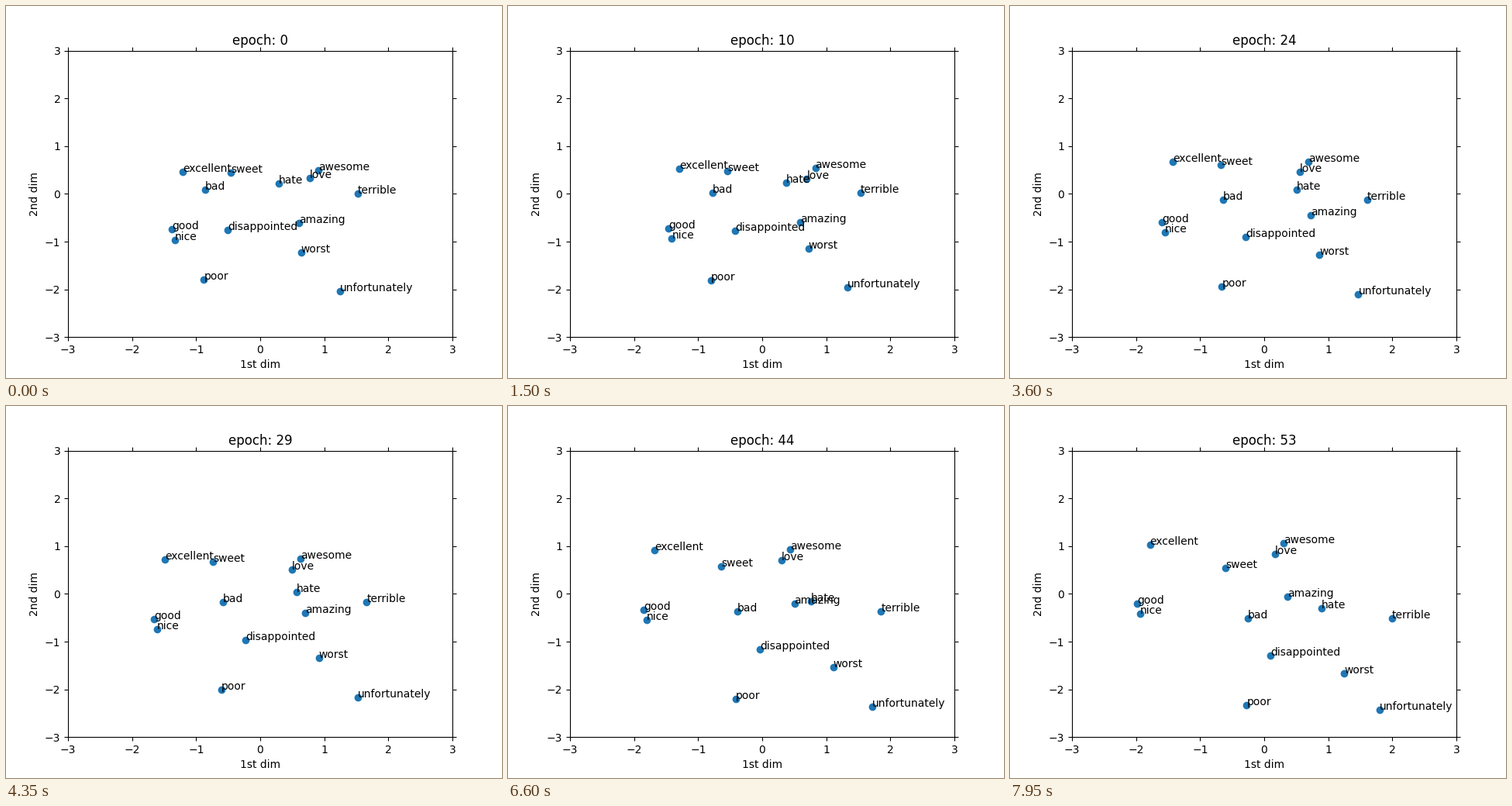
A matplotlib script for the animation above (8000 ms loop, 640x480 px).

```python
import numpy as np
import matplotlib.pyplot as plt
from matplotlib.animation import FuncAnimation

FRAMES, INTERVAL, FRAMES_PER_EPOCH = 160, 50, 3
UP_LEFT, DOWN_RIGHT = np.array([-1, 1]), np.array([1, -1])
X_ONLY, BOTH = np.array([1, 0]), np.array([1, 1])

# word: (x, y, vertical distance lost while starting the wrong way)
PRAISE = {
    "excellent": (-1.21, 0.46, 0.01),
    "good": (-1.38, -0.74, 0.065),
    "nice": (-1.33, -0.97, 0.05),
    "sweet": (-0.46, 0.445, 0.05),
    "love": (0.775, 0.33, 0.095),
    "awesome": (0.91, 0.49, 0.03),
    "amazing": (0.605, -0.61, 0.06),
}
CRITICISM = {
    "bad": (-0.86, 0.09, 0.01),
    "poor": (-0.88, -1.795, 0.07),
    "disappointed": (-0.505, -0.755, 0.07),
    "hate": (0.29, 0.215, 0.095),
    "worst": (0.64, -1.225, 0.16),
    "terrible": (1.525, 0.005, 0.095),
    "unfortunately": (1.25, -2.04, 0.155),
}
WORDS = PRAISE | CRITICISM

# word: (epoch of a later reversal, distance lost, axes)
REVERSALS = {
    "amazing": (6, 0.37, X_ONLY),
    "terrible": (6, 0.14, X_ONLY),
    "sweet": (33, 0.46, BOTH),
    "excellent": (50, 0.035, BOTH),
    "unfortunately": (50, 0.055, BOTH),
}


def drift(epoch):
    return 0.0072 * epoch + 0.00008 * epoch ** 2


def lost(epoch, start, limit):
    """Ground lost by running backwards from start until limit is used up."""
    return np.clip(2 * (drift(epoch) - drift(start)), 0, limit)


def position(word, epoch):
    x, y, lag = WORDS[word]
    travel = drift(epoch) - np.array([0, lost(epoch, 0, lag)])
    if word in REVERSALS:
        start, limit, axes = REVERSALS[word]
        travel = travel - axes * lost(epoch, start, limit)
    heading = UP_LEFT if word in PRAISE else DOWN_RIGHT
    return np.array([x, y]) + heading * travel


fig, ax = plt.subplots(figsize=(6.4, 4.8), dpi=100)
ax.set(xlim=(-3, 3), ylim=(-3, 3), xlabel="1st dim", ylabel="2nd dim")
ax.tick_params(top=True, right=True)
title = ax.set_title("epoch: 0", pad=5.3)
start_points = np.array([position(word, 0) for word in WORDS])
dots = ax.scatter(*start_points.T, color="tab:blue")
labels = [ax.text(*point, word) for point, word in zip(start_points, WORDS)]


def update(frame):
    epoch = frame // FRAMES_PER_EPOCH
    points = [position(word, epoch) for word in WORDS]
    dots.set_offsets(points)
    for label, point in zip(labels, points):
        label.set_position(point)
    title.set_text(f"epoch: {epoch}")
    return dots, title, *labels


animation = FuncAnimation(fig, update, frames=FRAMES, interval=INTERVAL,
                          repeat=True, repeat_delay=0, blit=False)
plt.show()
```
